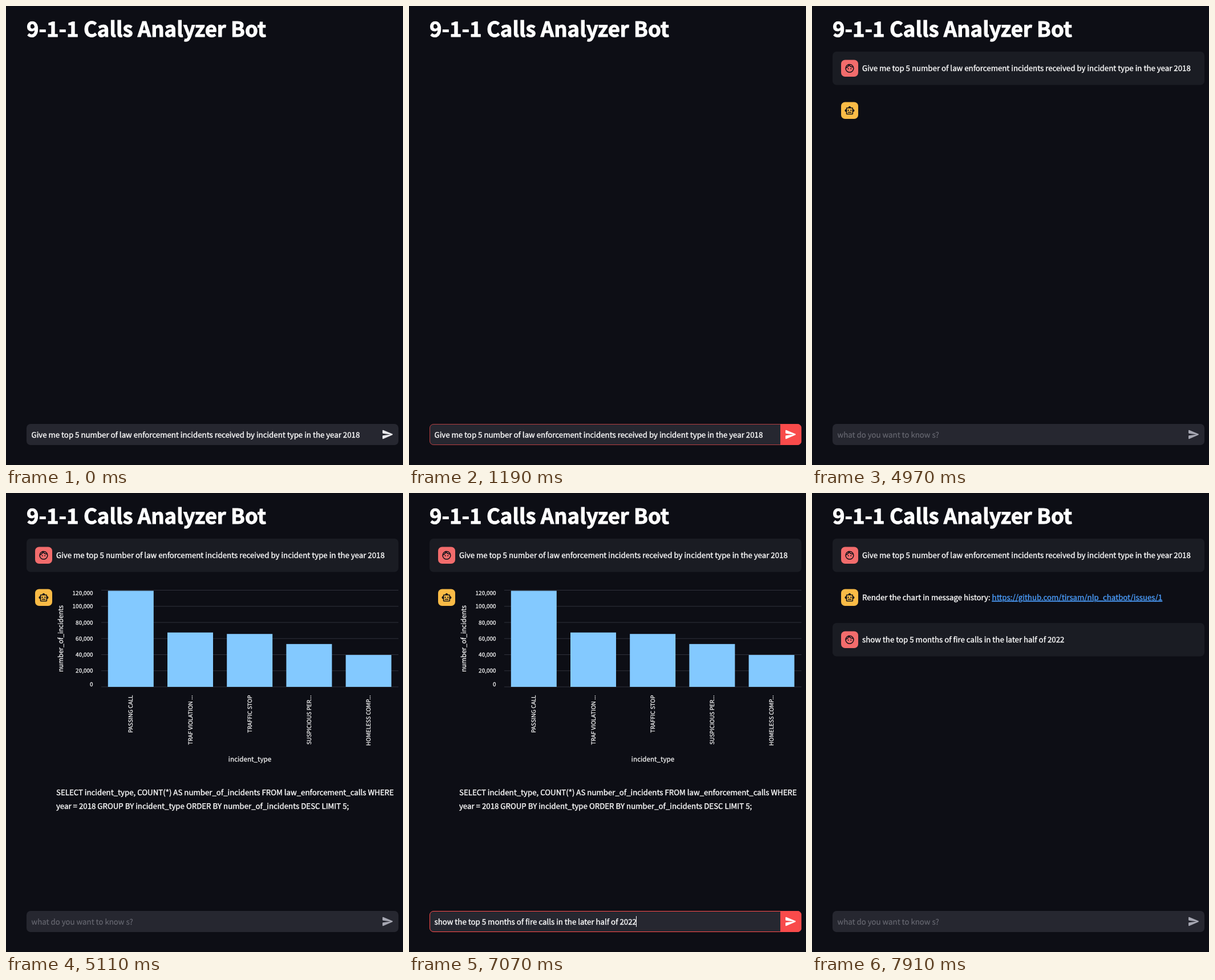
An HTML page that plays this animation: 696 px wide and 805 px high, repeating every 8000 ms.

```html
<!DOCTYPE html>
<html lang="en">
<head>
<meta charset="utf-8">
<title>Calls analyzer chat</title>
<style>
html, body { margin: 0; width: 100%; height: 100%; overflow: hidden; background: #0d0e15; }
svg { display: block; width: 696px; height: 805px; }
text {
  font: 13.28px "Noto Sans CJK JP", "Noto Sans CJK SC", "Noto Sans", sans-serif;
  color: #fafafa; fill: currentColor; stroke: currentColor; stroke-width: .4px;
  text-rendering: geometricPrecision; white-space: pre;
}
.title { font-size: 36.5px; font-weight: 700; stroke-width: 1px; color: #fff; }
.tick { font-size: 9.96px; text-anchor: end; stroke-width: .25px; }
.axis { font-size: 11.67px; text-anchor: middle; stroke-width: .25px; }
.hint { color: #666770; stroke-width: .2px; }
.link { fill: #4a9bf8; stroke: #4a9bf8; text-decoration: underline; }
</style>
</head>
<body>
<svg id="stage" viewBox="0 0 696 805"></svg>
<script>
const question1 = 'Give me top 5 number of law enforcement incidents received by incident type in the year 2018';
const question2 = 'show the top 5 months of fire calls in the later half of 2022';

const text = (x, y, content, attrs = '') => `<text x="${x}" y="${y}" ${attrs}>${content}</text>`;
const group = (id, content) => `<g id="${id}">${content}</g>`;

function avatar(y, color, icon) {
  return `<rect x="51" y="${y}" width="30" height="29.6" rx="7" fill="${color}"/>
    <g transform="translate(56.7 ${y + 5.6}) scale(.77)" fill="#0e1117">${icon}</g>`;
}
const faceIcon = `<g fill="none" stroke="#0e1117" stroke-width="2"><circle cx="12" cy="12" r="9"/>
  <path d="M3.5 10.8C7 9.8 9.3 7.6 10.5 4C12.5 7.5 16 9.3 20.5 9"/></g>
  <circle cx="9" cy="13" r="1.3"/><circle cx="15" cy="13" r="1.3"/>`;
const robotIcon = `<path d="M20 9V7c0-1.1-.9-2-2-2h-3c0-1.66-1.34-3-3-3S9 3.34 9 5H6c-1.1 0-2 .9-2 2v2c-1.66 0-3 1.34-3 3s1.34 3 3 3v4c0 1.1.9 2 2 2h12c1.1 0 2-.9 2-2v-4c1.66 0 3-1.34 3-3s-1.34-3-3-3zm-2 10H6V7h12z"/>
  <circle cx="9" cy="11.5" r="1.5"/><circle cx="15" cy="11.5" r="1.5"/><path d="M8 15h8v2H8z"/>`;
const sendIcon = 'M3.4 20.4l17.45-7.48c.81-.35.81-1.49 0-1.84L3.4 3.6c-.66-.29-1.39.2-1.39.91L2 9.12c0 .5.37.93.87.99L17 12 2.87 13.88c-.5.07-.87.5-.87 1l.01 4.61c0 .71.73 1.2 1.39.91z';

const userMessage = (y, content) =>
  `<rect x="36" y="${y}" width="652" height="58.6" rx="7" fill="#1a1c23"/>` +
  avatar(y + 14.5, '#f26c6c', faceIcon) + text(88, y + 34, content);

function chart() {
  const base = 340, step = 28.25;
  const bars = [['PASSING CALL', 119300], ['TRAF VIOLATION ...', 67500], ['TRAFFIC STOP', 65700],
    ['SUSPICIOUS PER...', 53200], ['HOMELESS COMP...', 39600]];
  let out = '';
  for (let i = 0; i <= 6; i++) {
    const y = base - i * step;
    const labelY = i === 0 ? 335 : i === 6 ? 175 : y;
    out += `<path d="M167 ${y}H688" stroke="#2f313b"/>` +
      text(152.5, labelY + 3.7, (i * 20000).toLocaleString('en-US'), 'class="tick"');
  }
  bars.forEach(([name, value], i) => {
    const x = 178.8 + i * 104.2, height = value / 20000 * step;
    out += `<rect x="${x}" y="${base - height}" width="80" height="${height}" fill="#83c9ff"/>` +
      text(0, 0, name, `class="tick" transform="translate(${x + 43.6} 354.5) rotate(-90)"`);
  });
  return out + text(427.5, 471, 'incident_type', 'class="axis"') +
    text(0, 0, 'number_of_incidents', 'class="axis" transform="translate(99.5 255.5) rotate(-90)"');
}

document.getElementById('stage').innerHTML =
  text(36, 54, '9-1-1 Calls Analyzer Bot', 'class="title"') +
  group('asked1', userMessage(80, question1)) +
  group('bot', avatar(168.5, '#fabb46', robotIcon)) +
  group('chart', chart()) +
  group('query',
    text(88, 530, 'SELECT incident_type, COUNT(*) AS number_of_incidents FROM law_enforcement_calls WHERE') +
    text(88, 554, 'year = 2018 GROUP BY incident_type ORDER BY number_of_incidents DESC LIMIT 5;')) +
  group('history',
    text(88, 188, 'Render the chart in message history: <tspan class="link">https://github.com/tirsam/nlp_chatbot/issues/1</tspan>') +
    userMessage(228, question2)) +
  `<rect x="36" y="733" width="652" height="37" rx="7" fill="#262730"/>
  <rect id="border" x="36.5" y="733.5" width="651" height="36" rx="6.5" fill="none" stroke="#ff4b4b"/>
  <path id="button" d="M651 733h30a7 7 0 0 1 7 7v23a7 7 0 0 1-7 7h-30z" fill="#f94b4b"/>
  <path id="send" transform="translate(658.2 740.4) scale(.9225)" d="${sendIcon}"/>` +
  text(44.5, 756.5, 'what do you want to know s?', 'id="hint" class="hint"') +
  text(44.5, 756.5, question1, 'id="typed1"') +
  text(44.5, 756.5, question2, 'id="typed2"') +
  '<path id="caret" d="M0 742V761" stroke="#fafafa"/>';

const el = id => document.getElementById(id);
const show = (id, on) => { el(id).style.display = on ? '' : 'none'; };
const ramp = (t, start) => Math.min(1, Math.max(0, (t - start) / 200));

function draw(time) {
  const t = Math.floor(time / 70) * 70;
  const within = (from, to) => t >= from && t < to;
  const typed1 = t < 1400, typed2 = within(6510, 7840);
  const hover = within(840, 1400) || within(7070, 7140) || within(7280, 7840);
  const bright = typed1 || within(6580, 7840);

  show('asked1', t >= 1470);
  show('bot', t >= 4970);
  show('chart', within(5040, 7910));
  show('query', within(5110, 7910));
  show('history', t >= 7910);
  show('typed1', typed1);
  show('typed2', typed2);
  show('hint', !typed1 && !typed2);
  show('button', hover);
  el('send').setAttribute('fill', hover ? '#fff' : bright ? '#e8e8ec' : '#a6a7b2');

  // Focus and blur fade the border over 200 ms.
  el('border').setAttribute('opacity',
    ramp(t, 230) - ramp(t, 1120) + ramp(t, 5900) - ramp(t, 7560));

  show('caret', within(350, 840) || within(6020, 6440) || within(6510, 7140));
  el('caret').setAttribute('transform', `translate(${typed1 ? 620 : typed2 ? 398.5 : 44.5} 0)`);
}

function tick() {
  draw(performance.now() % 8000);
  requestAnimationFrame(tick);
}
tick();
</script>
</body>
</html>
```
